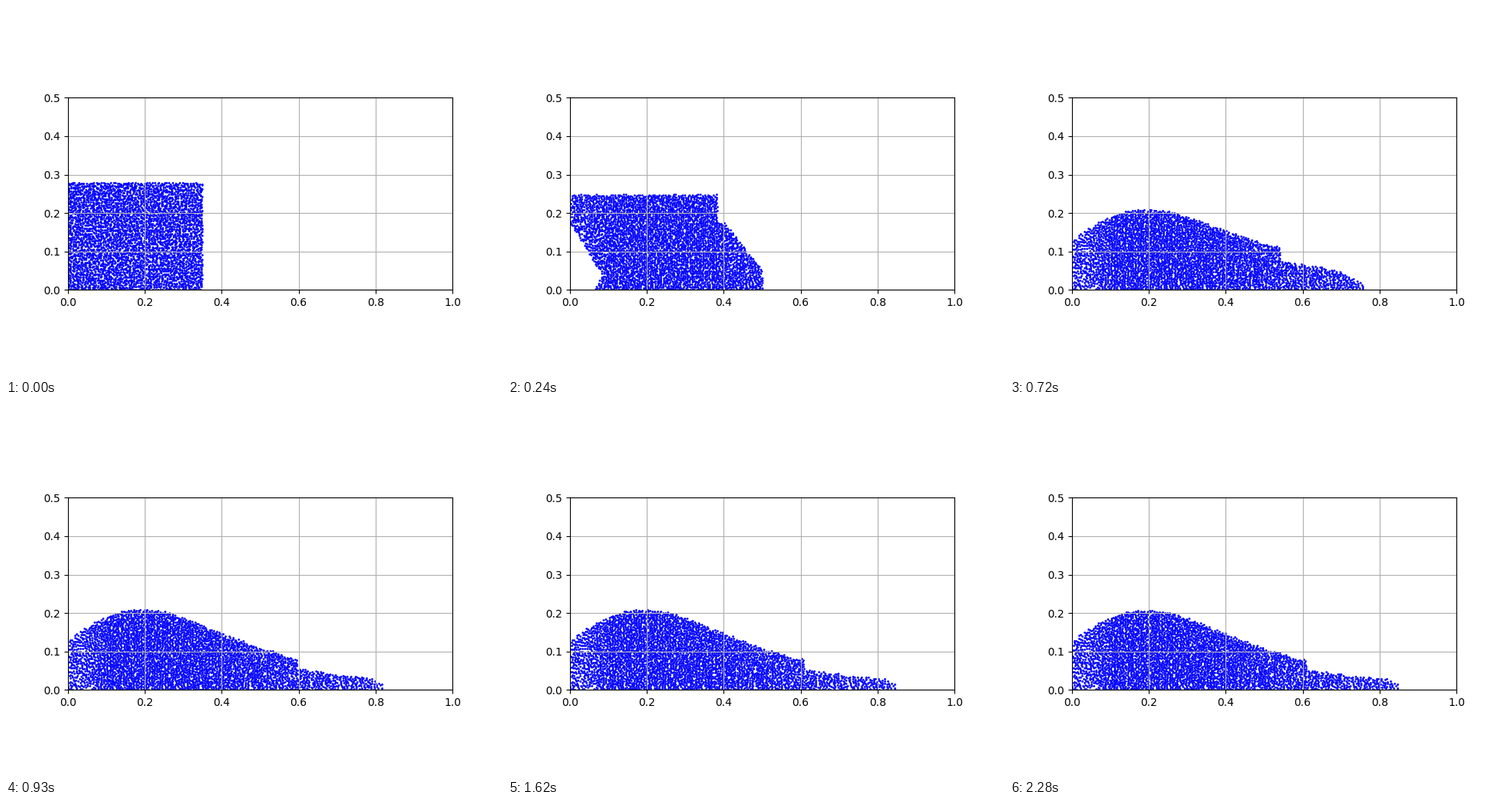
These frames come from a looping animation (640 px wide and 480 px high, 2310 ms). A matplotlib script:

```python
import numpy as np
import matplotlib.pyplot as plt
from matplotlib.animation import FuncAnimation

FRAMES, INTERVAL = 77, 30
COLS, ROWS = 70, 56
WIDTH, HEIGHT = 0.35, 0.28
GAP = 0.0042          # smallest distance the particles try to keep
rng = np.random.default_rng(4)
xs = np.linspace(0, 0.86, 3441)
bumps = np.interp(xs, np.arange(0, 0.87, 0.006), rng.uniform(0, 0.007, 145))


def ramp(k, start, end):
    return np.clip((k - start) / (end - start), 0, 1)


def ease_out(k, start, end):
    return 1 - (1 - ramp(k, start, end)) ** 2


def smooth(k, start, end):
    s = ramp(k, start, end)
    return s * s * (3 - 2 * s)


def mirror(v):
    """Fold values that left the range 0 to 1 back into it."""
    return np.clip(1 - np.abs(1 - np.abs(v)), 0, 1)


class Shape:
    """Region filled by particles, with a map to and from the unit square."""

    def __init__(self, k):
        creep = ramp(k, 40, 76)
        self.front = (WIDTH + 0.3 * ramp(k, 0, 16)
                      + 0.193 * ease_out(k, 16, 40) + 0.003 * creep)
        foot = 0.09 * ramp(k, 0, 8)
        self.wedge = np.clip(1.5 * (xs - foot * 2 / 3), 0, 1)
        self.hole = np.clip(self.underside(k, foot) - self.wedge, 0, 1)
        top = self.surface(k, 0.213 - 0.002 * creep)
        self.depth = np.maximum(top - self.hole, 1e-7)
        loose = np.exp(-(xs / 0.08) ** 4) + ramp(xs, 0.38, 0.83)
        weight = 1 - 0.28 * ramp(k, 0, 16) * loose
        self.cum = np.cumsum(self.depth * weight)
        self.cum = (self.cum - self.cum[0]) / (self.cum[-1] - self.cum[0])

    def surface(self, k, peak):
        """A flat sinking lid that turns into a dome, with a step and a toe."""
        left = xs < 0.19
        dome = np.where(left, peak - 0.083 * (1 - xs / 0.19) ** 2,
                        peak / (1 + ((xs - 0.19) / 0.326) ** 2))
        lid = max(peak, HEIGHT - 0.00375 * k)
        mix = np.where(left, ease_out(k, 8, 16), ease_out(k, 8, 32))
        crown = lid + mix * (dome - lid) - bumps * ramp(k, 0, 16)
        corner = WIDTH + 0.26 * smooth(k, 0, 36)
        toe = (0.016 + 0.264 * np.exp(-k / 4)
               + max(0.5, 10 / max(k, 1)) * (self.front - xs))
        top = np.where(xs <= corner, crown, np.minimum(0.7 * crown, toe))
        return np.where(xs <= self.front, top, 0)

    def underside(self, k, foot):
        """Lower left edge: an overhang that falls and leaves a small pocket."""
        lift = 0.22 * max(0, 1 - (k / 18) ** 2)
        slope = lift * (1 - xs / (1.2 * foot + 1e-6))
        return np.where(xs < foot, np.maximum(slope, 0.4 * (xs - 0.03)), 0)

    def column(self, x):
        return [np.interp(x, xs, c) for c in (self.wedge, self.hole, self.depth)]

    def to_unit(self, p):
        x = self.front * mirror(p[:, 0] / self.front)
        wedge, hole, depth = self.column(x)
        y = p[:, 1]
        y = np.where(y > wedge + hole / 2, np.maximum(y - hole, wedge),
                     np.minimum(y, wedge))
        return np.interp(x, xs, self.cum), mirror(y / depth)

    def from_unit(self, u, v):
        x = np.interp(u, self.cum, xs)
        wedge, hole, depth = self.column(x)
        y = v * depth
        return np.column_stack([x, y + hole * (y >= wedge)])


def push_apart(p, strength):
    """Separate close neighbours, found in strips with a random offset."""
    strip = np.floor(p[:, 1] / (2 * GAP) + rng.random())
    order = np.lexsort((p[:, 0], strip))
    q = p[order]
    for j in range(1, 6):
        diff = q[j:] - q[:-j]
        dist = np.hypot(diff[:, 0], diff[:, 1])
        pull = strength * np.clip(GAP - dist, 0, None) / (dist + 1e-6)
        step = diff * pull[:, None]
        q[j:] += step
        q[:-j] -= step
    out = np.empty_like(p)
    out[order] = q
    return out


def flow():
    gx, gy = np.meshgrid(np.arange(COLS), np.arange(ROWS))
    cells = np.column_stack([gx.ravel(), gy.ravel()]) + 0.5
    cells += rng.uniform(-0.45, 0.45, cells.shape)
    p = cells / [COLS, ROWS] * [WIDTH, HEIGHT]
    path = [p]
    shape = Shape(0)
    for k in range(1, FRAMES):
        u, v = shape.to_unit(p)
        shape = Shape(k)
        p = shape.from_unit(u, v)
        strength = 0.25 * (1 - ramp(k, 16, 40))
        if strength > 0:
            for _ in range(4):
                p = push_apart(p, strength)
            p = shape.from_unit(*shape.to_unit(p))
        path.append(p)
    return path


path = flow()

fig, ax = plt.subplots(figsize=(6.4, 4.8), dpi=100)
ax.set_aspect("equal")
ax.set_xlim(0, 1)
ax.set_ylim(0, 0.5)
ax.grid(True)
dots = ax.scatter(path[0][:, 0], path[0][:, 1], s=1, c="blue")


def draw(k):
    dots.set_offsets(path[k])
    return dots,


anim = FuncAnimation(fig, draw, frames=FRAMES, interval=INTERVAL,
                     init_func=lambda: draw(0), repeat=True, repeat_delay=0)
plt.show()
```
